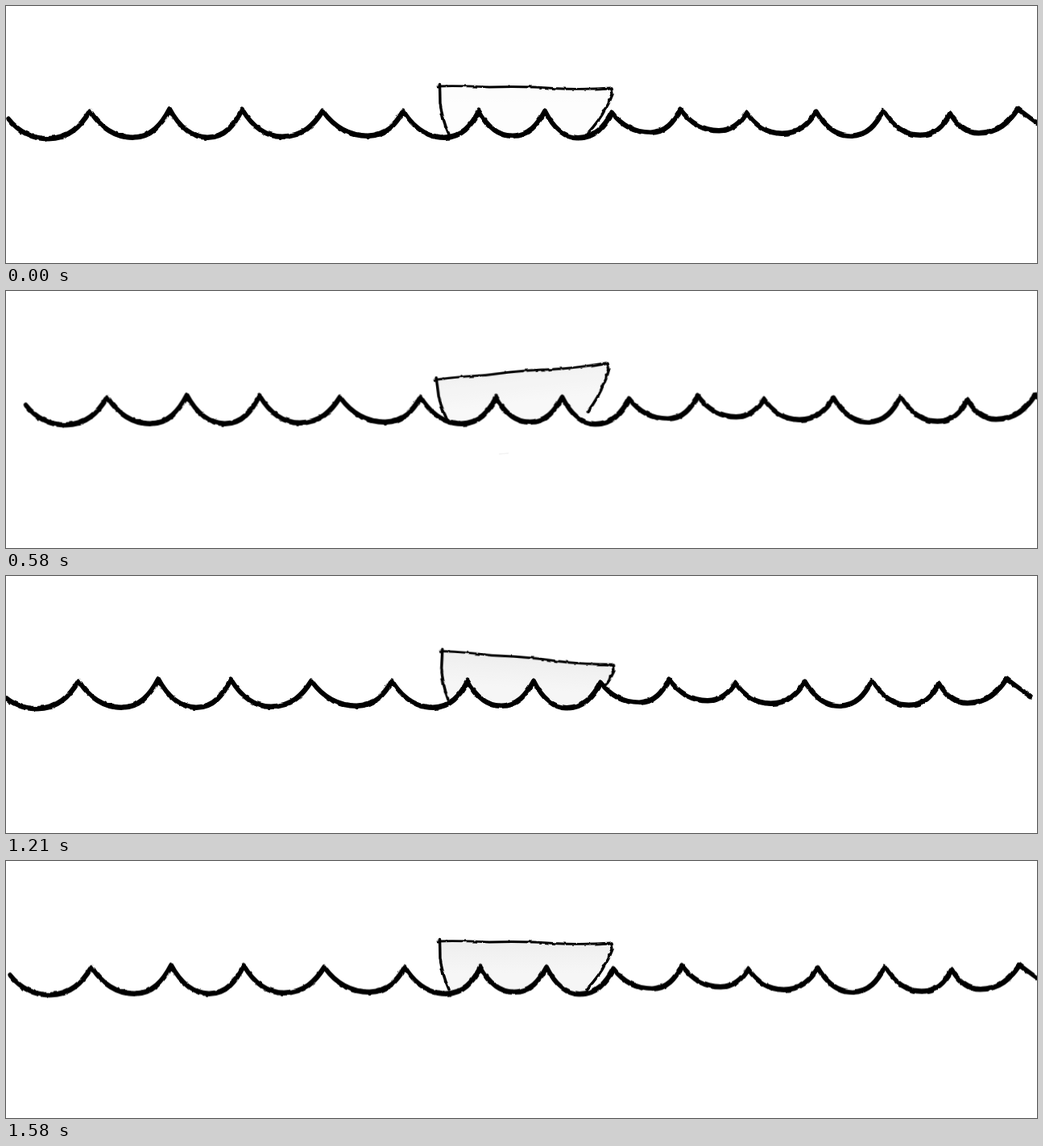
Animation of 1280 by 320 pixels, one loop 1.71 s. Source, as an HTML page:

```html
<!DOCTYPE html>
<html lang="en">
<head>
<meta charset="utf-8">
<title>Boat on waves</title>
<style>
  html, body { margin: 0; width: 100%; height: 100%; overflow: hidden; background: #fff; }
  svg { display: block; width: 100vw; height: 100vh; }
  .ink { fill: none; stroke: #000; stroke-linecap: round; stroke-linejoin: round; }

  #sea, #boat, #shade, #speck { animation: 1710ms step-end infinite; }
  #sea { animation-name: drift; }
  #boat { animation-name: tilt; transform-origin: 633px 143px; }
  #shade { animation-name: shade; }
  #speck { animation-name: speck; }

  /* Swing right, drift back left, return: held poses of about 125 ms */
  @keyframes drift {
    0%      { transform: translate(0, 0); }
    4.67%   { transform: translate(7px, .5px); }
    12.27%  { transform: translate(17px, 1px); }
    19.29%  { transform: translate(27px, 1.7px); }
    26.89%  { transform: translate(27.5px, 1.6px); }
    33.91%  { transform: translate(21.5px, 1.5px); }
    41.51%  { transform: translate(14.5px, 1.4px); }
    48.53%  { transform: translate(8px, 1.2px); }
    56.13%  { transform: translate(1px, 1px); }
    63.15%  { transform: translate(-6px, .5px); }
    70.75%  { transform: translate(-14px, 0); }
    77.77%  { transform: translate(-20px, .7px); }
    85.37%  { transform: translate(-12px, 1.5px); }
    92.39%  { transform: translate(2px, 1.5px); }
  }
  @keyframes tilt {
    0%      { transform: rotate(0deg); }
    4.67%   { transform: rotate(-2.1deg); }
    12.27%  { transform: rotate(-5.5deg); }
    19.29%  { transform: rotate(-8.7deg); }
    26.89%  { transform: rotate(-8.3deg); }
    33.91%  { transform: rotate(-6.2deg); }
    41.51%  { transform: rotate(-4deg); }
    48.53%  { transform: rotate(-1.9deg); }
    56.13%  { transform: rotate(.4deg); }
    63.15%  { transform: rotate(2.1deg); }
    70.75%  { transform: rotate(3.9deg); }
    77.77%  { transform: rotate(3.6deg); }
    85.37%  { transform: rotate(1.8deg); }
    92.39%  { transform: rotate(0deg); }
  }
  @keyframes shade {
    0%     { opacity: .15; }
    4.67%  { opacity: .3; }
    19.29% { opacity: .6; }
    33.91% { opacity: .8; }
    48.53% { opacity: 1; }
  }
  @keyframes speck {
    0%     { opacity: 0; }
    12.27% { opacity: 1; }
    41.51% { opacity: 0; }
  }
</style>
</head>
<body>
<svg viewBox="0 0 1280 320">
  <defs>
    <linearGradient id="hull" x2="0" y2="1">
      <stop offset="0" stop-color="#eee"/>
      <stop offset=".6" stop-color="#f6f6f6"/>
    </linearGradient>
    <filter id="rough" filterUnits="userSpaceOnUse" x="-20" y="60" width="1340" height="150" color-interpolation-filters="sRGB">
      <feTurbulence type="fractalNoise" baseFrequency=".09" numOctaves="2" seed="4"/>
      <feDisplacementMap in="SourceGraphic" scale="3" xChannelSelector="R" yChannelSelector="G"/>
    </filter>
  </defs>

  <g id="boat">
    <path id="shade" fill="url(#hull)" d="M538 100L645 101L752 102L753 110L734 146L718 166H552L543 140Z"/>
    <g class="ink" filter="url(#rough)">
      <path stroke-width="2.8" d="M536 100Q560 99 600 101Q645 99.500 680 102.500Q715 104.500 752 102"/>
      <path stroke-width="3.400" d="M538.500 97.500L539 120Q541 140 550 160M752 102L753 110Q748 123 744 128Q738 141 721 160"/>
    </g>
  </g>

  <g id="sea">
    <path id="water" fill="#fff"/>
    <g class="ink" filter="url(#rough)">
      <path class="wave" stroke-width="5.200"/>
      <path class="wave" stroke-width="5.200" transform="translate(.4 1.400)"/>
    </g>
  </g>

  <path id="speck" fill="none" stroke="#f3f3f3" stroke-width="1.500" d="M612 203L624 202"/>
</svg>
<script>
  // Crests and the troughs between them, as x, y pairs
  const crests = [[3, 140], [104, 130], [203, 127.5], [293, 128], [393, 130], [493, 130], [587, 130], [669, 130],
    [752, 132], [837, 128], [919, 132], [1006, 131], [1089, 129.5], [1172, 133], [1256, 127.5]];
  const troughs = [[52, 164.5], [157, 163], [250, 163], [343, 162], [449, 161], [544, 163], [628, 161], [710, 163.5],
    [800, 157], [885, 154.5], [963, 158], [1049, 161], [1135, 160], [1207, 157.5]];

  const scoop = ([tx, ty], i) => {
    const [x0, y0] = crests[i], [x1, y1] = crests[i + 1];
    const a = tx - x0, b = x1 - tx;
    return `C${x0 + .2 * a} ${y0 + .5 * (ty - y0)} ${tx - .5 * a} ${ty} ${tx} ${ty}` +
      `C${tx + .5 * b} ${ty} ${x1 - .22 * b} ${y1 + .55 * (ty - y1)} ${x1} ${y1}`;
  };

  const line = `M${crests[0]}` + troughs.map(scoop).join('') + 'Q1271 139 1286 149.500';
  document.querySelectorAll('.wave').forEach(p => p.setAttribute('d', line));
  document.getElementById('water').setAttribute('d', line + 'V260H3Z');
</script>
</body>
</html>
```
